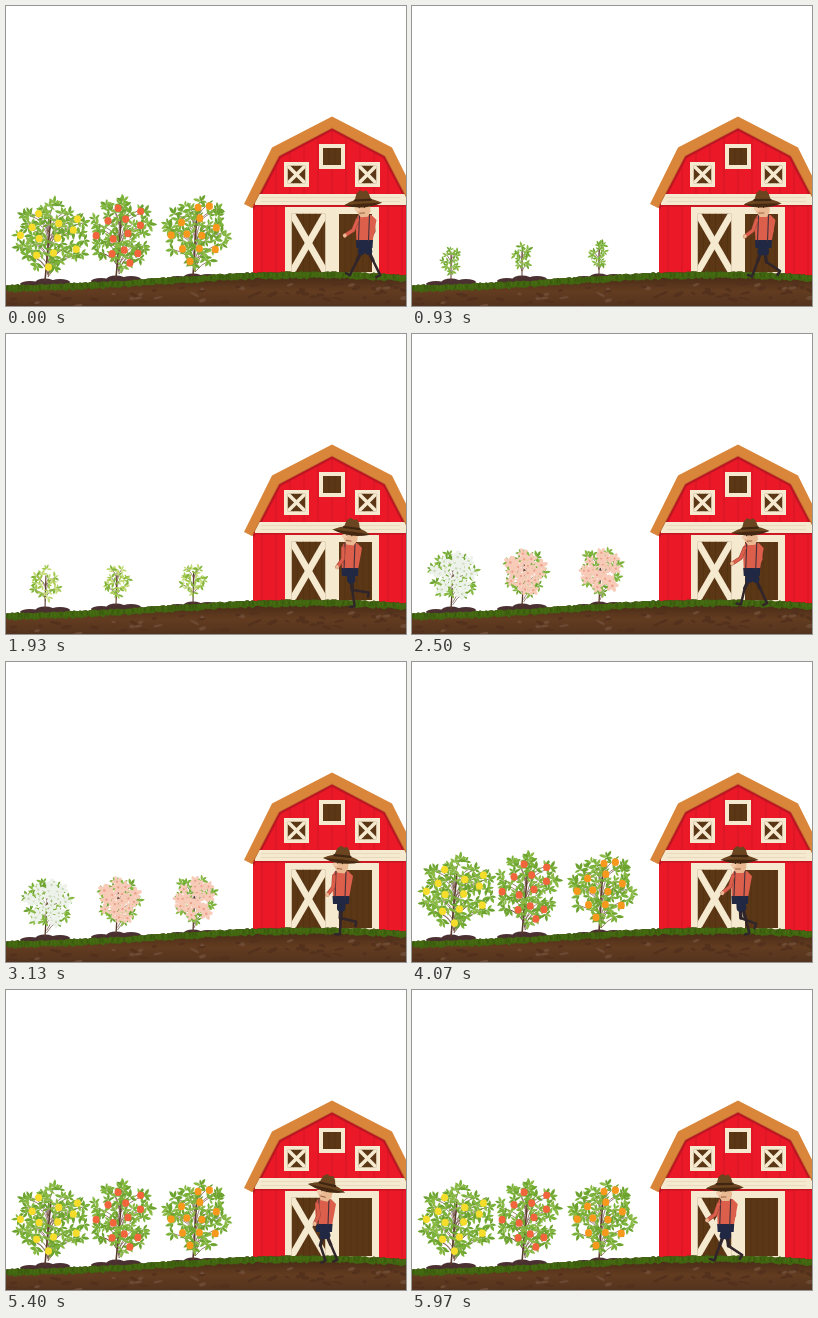
These frames come from a looping animation (400 px wide and 300 px high, 6010 ms). An HTML page with a canvas:

```html
<!DOCTYPE html>
<html lang="en">
<head>
<meta charset="utf-8">
<title>Orchard walk</title>
<style>
html, body { margin: 0; width: 100%; height: 100%; overflow: hidden; background: #fff }
canvas { display: block }
</style>
</head>
<body>
<canvas id="stage" width="400" height="300"></canvas>
<script>
const LOOP = 6010, STRIDE = 840, FIRST = 830, STEP = 800, TAU = Math.PI * 2;
const { sin, cos, max, sqrt } = Math;
const screen = document.getElementById('stage').getContext('2d');
let g = screen;

function seeded(s) {
  return () => (s = (s * 16807) % 2147483647) / 2147483647;
}

function trace(points) {
  g.beginPath();
  for (const [x, y] of points) g.lineTo(x, y);
}
function poly(color, ...points) {
  trace(points);
  g.fillStyle = color; g.fill();
}
function line(color, width, ...points) {
  trace(points);
  g.strokeStyle = color; g.lineWidth = width; g.stroke();
}
function rect(color, x, y, w, h) { g.fillStyle = color; g.fillRect(x, y, w, h); }
function oval(color, x, y, rx, ry = rx, turn = 0) {
  g.beginPath(); g.ellipse(x, y, rx, ry, turn, 0, TAU);
  g.fillStyle = color; g.fill();
}
// Lens between two points, with a separate bulge on either side
function lens(color, x1, y1, x2, y2, up, down) {
  const mx = (x1 + x2) / 2, my = (y1 + y2) / 2;
  g.beginPath();
  g.moveTo(x1, y1);
  g.quadraticCurveTo(mx, my - up, x2, y2);
  g.quadraticCurveTo(mx, my + down, x1, y1);
  g.fillStyle = color; g.fill();
}

// Barn
const CREAM = '#f5ead0', DARK = '#5c3716', RED = '#eb1928', RIDGE = 326;
const mirror = points => [...points, ...points.map(([x, y]) => [2 * RIDGE - x, y]).reverse()];

function pane(x, y, w, h, edge, crossed) {
  rect(CREAM, x, y, w, h);
  const l = x + edge, t = y + edge, r = x + w - edge, b = y + h - edge;
  g.save();
  g.beginPath(); g.rect(l, t, r - l, b - t); g.clip();
  rect(DARK, l, t, r - l, b - t);
  for (let k = l + 6; k < r; k += 6) line('#50300f', .6, [k, t], [k, b]);
  if (crossed) {
    line(CREAM, edge, [l, t], [r, b]);
    line(CREAM, edge, [r, t], [l, b]);
  }
  g.restore();
}

function barn() {
  const outer = [[238, 198], [266, 141.5], [RIDGE, 110.5]];
  const inner = [[246, 202], [273, 150], [RIDGE, 122]];
  const walls = [[247, 275], [247, 198], ...inner.slice(1)];
  g.save();
  trace(mirror(walls)); g.clip();
  rect(RED, 240, 110, 160, 170);
  for (let x = 256; x < 400; x += 14) line('#cf1522', .9, [x, 120], [x, 275]);
  line('#bd1522', 5, ...mirror(inner));
  g.restore();
  rect('#c41622', 248, 199, 152, 1.5);
  rect(CREAM, 249, 188, 151, 11);
  for (const y of [191.5, 195.5]) line('#ded0b0', .6, [255, y], [394, y]);
  poly('#d9863a', ...outer, ...mirror(outer).slice(3), ...mirror(inner).reverse());
  line('#b9692a', .8, ...mirror(inner));
  pane(313, 138, 26, 25, 4, false);
  for (const x of [278, 349]) pane(x, 156, 25, 25, 3.5, true);
  pane(279, 201, 47, 72, 6.5, true);
  pane(326, 201, 47, 72, 7, false);
}

// Ground
const land = x => 273 + 6.5 * cos(x / 96);

function ground() {
  const rnd = seeded(77), soil = g.createLinearGradient(0, 270, 0, 300);
  soil.addColorStop(0, '#482b17');
  soil.addColorStop(.5, '#633c20');
  soil.addColorStop(1, '#54331e');
  const top = [], under = [];
  for (let x = 0; x <= 400; x += 2) {
    top.push([x, land(x) - rnd() * 1.4]);
    under.unshift([x, land(x) + 4.5 + rnd() * 2.5]);
  }
  poly(soil, ...top, [400, 300], [0, 300]);
  for (let i = 0; i < 70; i++) {
    const x = rnd() * 400, y = land(x) + 10 + rnd() * 18;
    oval(rnd() < .8 ? '#53311d' : '#6c4a34', x, y, 2 + rnd() * 4, 1 + rnd(), rnd() - .5);
  }
  poly('#40640f', ...top, ...under);
  for (let x = 1; x < 400; x += 3)
    line(rnd() < .5 ? '#507816' : '#31500c', .7, [x, land(x) + 4], [x + rnd() * 2 - 1, land(x)]);
}

// Orchard
const trees = [
  { x: 39, y: 275, lean: 6, rx: 40, ry: 37, fruit: '#f6dc2b', bloom: '#edf2ea', heart: '#c9d8b8' },
  { x: 110, y: 272, lean: 6, rx: 34, ry: 37, fruit: '#f2643c', bloom: '#f8cbb9', heart: '#ee9d8b' },
  { x: 187, y: 270, lean: 4, rx: 34, ry: 36, fruit: '#f8981d', bloom: '#f8cbb9', heart: '#ee9d8b' }
];
const BLOSSOM = 2, UNRIPE = 3, RIPE = 4;

function leaf(color, x, y, turn, size) {
  g.save();
  g.translate(x, y); g.rotate(turn);
  lens(color, 0, 0, size, 0, size * .38, size * .38);
  g.restore();
}

function flower(tree, x, y, r, turn) {
  for (let a = turn; a < turn + TAU - .1; a += TAU / 5)
    oval(tree.bloom, x + cos(a) * r, y + sin(a) * r, r * .85, r * .55, a);
  oval(tree.heart, x, y, r * .35);
}

// Sunflower spread over an ellipse
function spread(count, rx, ry, rnd) {
  return Array.from({ length: count }, (_, i) => {
    const d = sqrt((i + .5) / count), a = i * 2.39996 + rnd() * .6;
    return [cos(a) * rx * d, sin(a) * ry * d, a];
  });
}

function plant(tree, stage, seed) {
  const rnd = seeded(seed), s = stage / RIPE, grown = s * s * (3 - 2 * s);
  const rx = tree.rx * (.23 + .77 * grown), ry = tree.ry * (.36 + .64 * grown);
  const size = 5.5 + 2 * grown;
  const greens = stage === 1 ? ['#a2c84b', '#84b53b', '#c3da78'] : ['#7bb239', '#6da32f', '#8aba45'];
  g.save();
  g.translate(tree.x + tree.lean * grown, tree.y - 8 - ry);
  const rootX = -tree.lean * grown, rootY = ry + 8;
  const tips = spread(Math.round(7 + rx * ry / 26), rx * .9, ry * .9, rnd);

  line('#5a3a2c', 1 + .6 * grown, [rootX, rootY], [rootX / 2, ry * .3], [0, -ry * .5]);
  tips.forEach(([x, y], i) => {
    if (i % 2) return;
    g.beginPath();
    g.moveTo(rootX / 2, Math.min(rootY - 4, y + ry * .5));
    g.quadraticCurveTo(x * .3, y + 4, x, y);
    g.strokeStyle = '#6b4c3c'; g.lineWidth = .7; g.stroke();
  });
  for (const [x, y, a] of tips) {
    const base = a + rnd() - .5;
    for (let k = -1.5; k < 2; k++)
      leaf(greens[Math.floor(rnd() * 3)], x, y, base + k * 1.05 + rnd() * .4, size * (.75 + rnd() * .4));
  }
  if (stage === BLOSSOM)
    for (const [x, y] of spread(19, rx * .85, ry * .85, rnd)) flower(tree, x, y, 2.7 + rnd(), rnd() * 6);
  if (stage >= UNRIPE)
    for (const [x, y] of spread(12, rx * .86, ry * .86, rnd)) {
      const r = stage === RIPE ? 3.5 : 2.2;
      oval(stage === RIPE ? tree.fruit : '#a9c93f', x, y, r, r * 1.1);
      leaf('#659e2f', x, y - r, -.6, 4.5);
    }
  g.restore();
}

function mound({ x, y }) {
  for (const side of [-1, 0, 1])
    oval('#4b3032', x + side * 15, y + 2 - side, 10, side ? 3 : 4.5);
}

const scenes = Array.from({ length: RIPE + 1 }, (_, stage) => {
  const c = document.createElement('canvas');
  c.width = 400; c.height = 300;
  g = c.getContext('2d');
  rect('#fff', 0, 0, 400, 300);
  barn();
  trees.forEach(mound);
  ground();
  trees.forEach((tree, i) => plant(tree, stage, 101 + i * 37 + stage * 11));
  return c;
});
g = screen;

// Farmer
const SKIN = '#e9b992', SHIRT = '#dc5f4c', NAVY = '#212843', BOOT = '#30252a';

function leg(x, y, phase) {
  const a = TAU * phase, lift = max(0, -sin(a));
  const thigh = .45 * cos(a) + .4 * sin(2 * a) * lift, shin = thigh - 1.4 * lift;
  const kx = x - sin(thigh) * 17, ky = y + cos(thigh) * 17;
  const fx = kx - sin(shin) * 16.5, fy = ky + cos(shin) * 16.5;
  line(BOOT, 2.5, [kx, ky], [fx, fy], [fx - cos(shin) * 4.5, fy - sin(shin) * 4.5]);
  line(BOOT, 3.4, [x, y], [kx, ky]);
  line(NAVY, 7.5, [x, y - 2], [x + (kx - x) * .4, y + (ky - y) * .4]);
}

function arm(x, y, swing) {
  const bend = swing + .6;
  const ex = x - sin(swing) * 11, ey = y + cos(swing) * 11;
  const hx = ex - sin(bend) * 10, hy = ey + cos(bend) * 10;
  line('#9c4439', 4, [x, y], [ex, ey], [hx, hy]);
  line(SHIRT, 3, [x, y], [ex, ey], [hx, hy]);
  oval(SKIN, hx, hy, 1.8, 2.1);
}

function head(x, y, tilt) {
  g.save();
  g.translate(x, y); g.rotate(tilt);
  poly(SKIN, [-7, -9], [7, -9], [7, 1], [4, 6], [-3, 6], [-7, 0]);
  oval('#f1cba9', -6, -2, 3, 1.8);
  for (const ex of [-4, 1]) {
    line('#3a2418', .9, [ex - 1.5, -5], [ex + 1.5, -5]);
    oval('#291c17', ex, -3.6, .6);
  }
  line('#8c4d38', .8, [-4, 2], [1, 2]);
  lens('#452811', -19, -7, 19, -7, 8, 7);
  lens('#6a451f', -19, -7, 19, -7, 11, -1);
  poly('#6a451f', [-8.5, -10], [-6, -18], [-2.5, -21], [1, -19.5], [4, -20.5], [6.5, -17], [8.5, -10]);
  line('#3f2612', 2.2, [-8, -11], [8, -11]);
  g.restore();
}

function farmer(t) {
  const x = 357.5 - t * .0075, c = t / STRIDE, wave = cos(TAU * c);
  g.lineCap = g.lineJoin = 'round';
  arm(x + 9, 214, .15 - .25 * wave);
  leg(x + 2, 239, c + .5);
  leg(x + 1, 239, c);
  poly(SHIRT, [x - 5, 209], [x + 8, 209], [x + 13, 214], [x + 9, 236], [x - 7, 236], [x - 8, 214]);
  poly(NAVY, [x - 7.5, 234], [x + 9.5, 234], [x + 9, 242], [x - 7, 242]);
  for (const side of [-4, 6]) line('#43303a', 1.1, [x + side, 209], [x + side - 1, 235]);
  arm(x - 6, 214, .1 + .3 * wave);
  head(x + 1 - wave, 205, .09 - .15 * wave);
}

function draw(now) {
  const t = now % LOOP, stage = Math.floor((t - FIRST) / STEP);
  g.drawImage(scenes[stage < 0 ? RIPE : Math.min(stage, RIPE)], 0, 0);
  farmer(t);
}

const start = performance.now();
function tick() {
  draw(performance.now() - start);
  requestAnimationFrame(tick);
}
tick();
</script>
</body>
</html>
```
